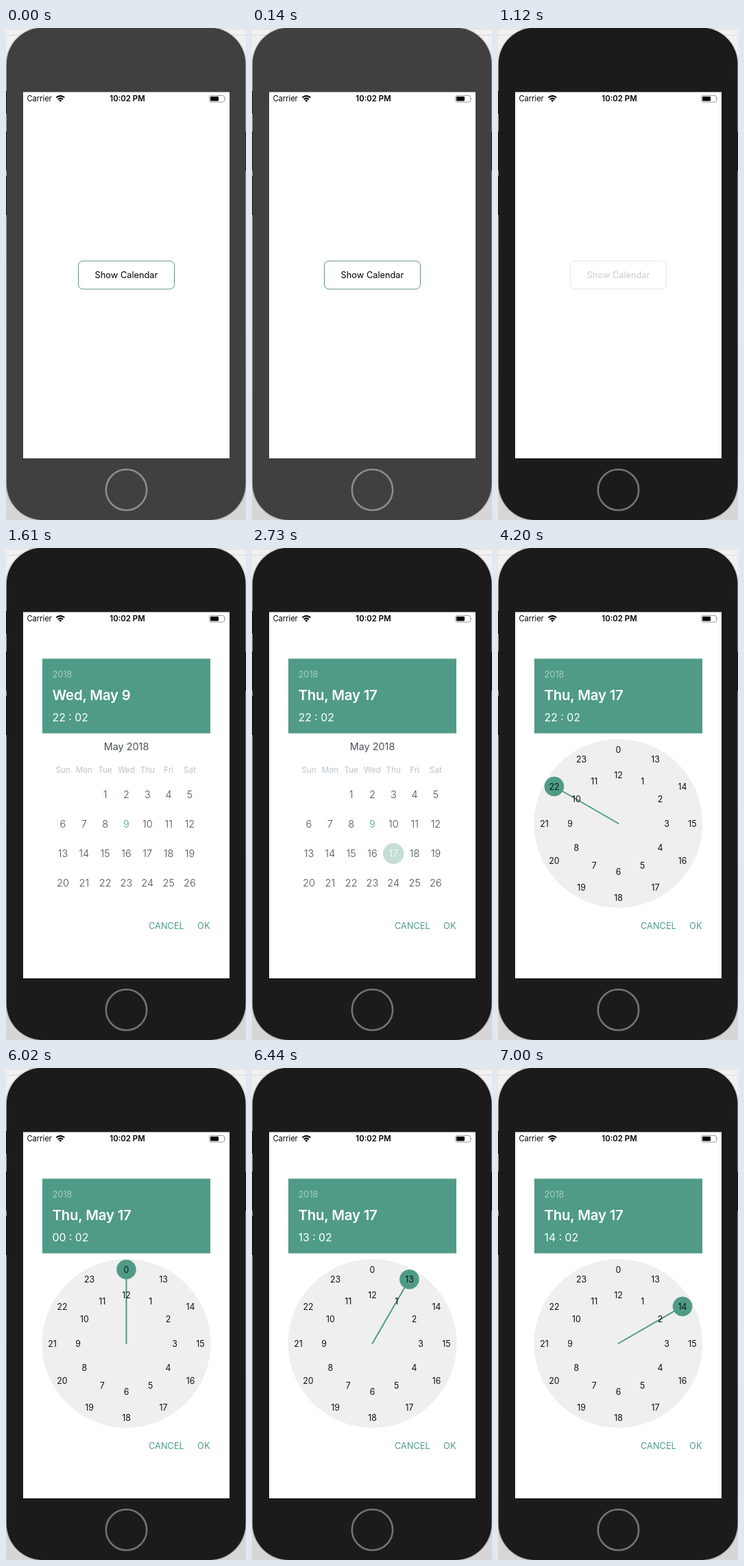
These frames come from a looping animation (350x718 px, 8 s). An HTML page:

```html
<!DOCTYPE html>
<html lang="en">
<head>
<meta charset="utf-8">
<title>Date and time picker</title>
<style>
  html, body { margin: 0; width: 100%; height: 100%; overflow: hidden; background: #e8e8e8; }
  svg { display: block; width: 100%; height: 100%; }
  text { font-family: Inter, "Liberation Sans", sans-serif; }
</style>
</head>
<body>
<svg id="stage" viewBox="0 0 350 718">
  <defs>
    <linearGradient id="desk" x2="0" y2="1">
      <stop offset="0" stop-color="#f1f1f1"/>
      <stop offset="1" stop-color="#d6d6d6"/>
    </linearGradient>
  </defs>
  <rect width="350" height="718" fill="url(#desk)"/>
  <path d="M0 1.5H350M0 10.5H350" stroke="#d9d9d9"/>
  <path d="M.5 92V125M.5 151V208M.5 216V273M349.5 151V208" stroke="#111"/>
  <rect x=".7" y="-.5" width="348.8" height="718.5" rx="53" fill="none" stroke="#000" stroke-opacity=".12" stroke-width="3"/>
  <rect id="bezel" x=".7" y="-.5" width="348.8" height="718.5" rx="53"/>
  <rect x="25" y="93.5" width="301" height="534.5" fill="#fff"/>
  <circle id="home" cx="175.5" cy="674" r="29.7" fill="none" stroke-width="2.6"/>

  <g id="status">
    <g fill="none" stroke="#000" stroke-width="2">
      <path d="M73.3 101.6Q79.3 96.6 85.3 101.6M75.6 104.1Q79.3 101.1 83 104.1"/>
    </g>
    <path d="M77.2 105.6Q79.3 104.1 81.4 105.6L79.3 107.9Z"/>
    <rect x="296.5" y="98.5" width="22" height="9.6" rx="2.4" fill="none" stroke="#999"/>
    <rect x="298" y="100" width="12" height="6.6" rx=".8"/>
    <path d="M319.6 101.6Q321.2 103.3 319.6 105Z" fill="#888"/>
  </g>

  <g id="launch">
    <rect x="105.5" y="340" width="140" height="41" rx="6.5" fill="#fff" stroke="#5f9186"/>
  </g>

  <g id="picker">
    <rect x="53" y="161.5" width="245" height="109" fill="#4f9b87"/>
    <g id="calendar"></g>
    <g id="clock">
      <circle cx="175.5" cy="402" r="123" fill="#efefef"/>
      <line id="hand" x1="175.5" y1="402" stroke="#4f9b87" stroke-width="2" stroke-linecap="round"/>
      <circle id="knob" r="14.3" fill="#4f9b87"/>
    </g>
  </g>
</svg>
<script>
const LOOP = 8000, TICK = 70;
const TEAL = '#4f9b87', INK = '#465158';
const CX = 175.5, CY = 402;
const $ = id => document.getElementById(id);

function add(parent, tag, attrs, content = '') {
  const el = document.createElementNS('http://www.w3.org/2000/svg', tag);
  for (const key in attrs) el.setAttribute(key, attrs[key]);
  el.textContent = content;
  return parent.appendChild(el);
}

function label(parent, content, x, y, size, fill, extra = {}) {
  return add(parent, 'text', { x, y, 'font-size': size, fill, ...extra }, content);
}

const middle = { 'text-anchor': 'middle' };
const set = (el, attrs) => { for (const key in attrs) el.setAttribute(key, attrs[key]); };
const show = (el, on) => el.setAttribute('display', on ? 'inline' : 'none');

label($('status'), 'Carrier', 30.5, 107, 11.1, '#000');
label($('status'), '10:02 PM', 177, 107, 11.4, '#000', { ...middle, 'font-weight': 600 });
label($('launch'), 'Show Calendar', CX, 365, 12.8, '#000', middle);

const picker = $('picker'), calendar = $('calendar'), clock = $('clock');
label(picker, '2018', 67.5, 188.5, 12.8, '#a7cdc3');
const date = label(picker, '', 67.5, 222, 20.4, '#fff', { 'font-weight': 600, 'letter-spacing': -.2 });
const time = label(picker, '', 67.5, 252.7, 15.8, '#fff');
label(picker, 'CANCEL', 208, 556, 12.8, TEAL);
label(picker, 'OK', 297.5, 556, 12.8, TEAL, { 'text-anchor': 'end' });

label(calendar, 'May 2018', CX, 295, 14.4, INK, middle);
const colX = i => 83 + i * 30.83;
['Sun', 'Mon', 'Tue', 'Wed', 'Thu', 'Fri', 'Sat'].forEach((name, i) =>
  label(calendar, name, colX(i), 328, 11.6, '#bac3ca', middle));

const picked = add(calendar, 'g', {});
const disc = add(picked, 'circle', { cx: colX(4), cy: 446, r: 15.2, fill: TEAL });
let pickedText;
for (let day = 1; day <= 26; day++) {
  const cell = day + 1, row = Math.floor(cell / 7);
  const text = label(day === 17 ? picked : calendar, day, colX(cell % 7), 364.8 + row * 43.2, 14.6,
    day === 9 ? TEAL : INK, { ...middle, 'font-weight': 300 });
  if (day === 17) pickedText = text;
}

// Hours 13-23 and 0 sit on the outer ring, 1-12 on the inner one.
function hourPos(h) {
  const r = h === 0 || h > 12 ? 108 : 70.5, a = h * Math.PI / 6;
  return [CX + r * Math.sin(a), CY - r * Math.cos(a)];
}
for (let h = 0; h < 24; h++) {
  const [x, y] = hourPos(h);
  label(clock, h, x, y + 4.5, 12.4, '#111', middle);
}

function hourAt(t) {
  if (t < 6020) return 22;
  if (t < 6440) return 0;
  return t < 6860 ? 13 : 14;
}

// A tapped day dims at once, then fades back in as selected.
function dayOpacity(t) {
  if (t < 2660 || t >= 2940) return 1;
  if (t < 2730) return .2;
  const k = (t - 2660) / 280;
  return .2 + .8 * k * k * (3 - 2 * k);
}

function draw(ms) {
  const t = Math.floor((ms % LOOP) / TICK) * TICK;
  const active = t >= 1120, open = t >= 1610, chosen = t >= 2730, onClock = t >= 4200;

  set($('bezel'), { fill: active ? '#1b1b1b' : '#404040' });
  set($('home'), { stroke: active ? '#737373' : '#8c8c8c' });
  set($('launch'), { opacity: active ? .2 : 1 });
  show($('launch'), !open);
  show(picker, open);
  show(calendar, !onClock);
  show(clock, onClock);

  date.textContent = chosen ? 'Thu, May 17' : 'Wed, May 9';
  show(disc, chosen);
  set(pickedText, { fill: chosen ? '#fff' : INK });
  set(picked, { opacity: dayOpacity(t) });

  const hour = hourAt(t), [x, y] = hourPos(hour);
  time.textContent = String(hour).padStart(2, '0') + ' : 02';
  set($('hand'), { x2: x, y2: y });
  set($('knob'), { cx: x, cy: y });
}

const start = performance.now();
function loop() {
  draw(performance.now() - start);
  requestAnimationFrame(loop);
}
loop();
</script>
</body>
</html>
```
